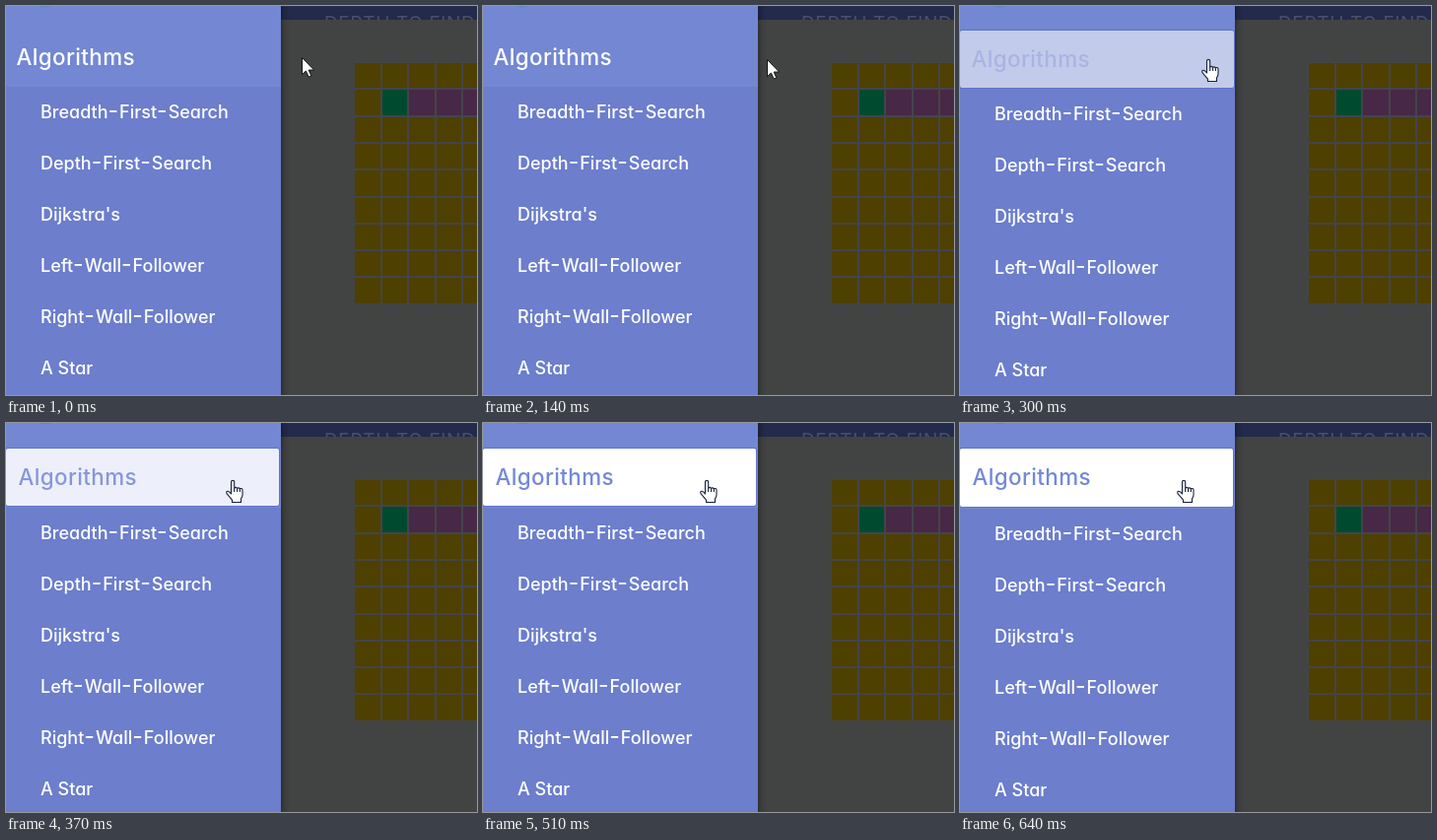
Write an HTML page that moves like this. It is 478x395 px and loops after 700 ms.

```html
<!DOCTYPE html>
<html lang="en">
<head>
<meta charset="utf-8">
<title>Algorithm menu</title>
<style>
  html, body { margin: 0; width: 100%; height: 100%; overflow: hidden; background: #424443; }
  svg { display: block; width: 478px; height: 395px; }
  text { font-family: Inter, "Open Sans", sans-serif; font-feature-settings: "cv11"; }
  #items text { font-size: 18px; font-weight: 500; fill: #fff; }
  #items .hyphen { font-size: 23px; font-weight: 400; letter-spacing: 1px; }
  #label { font-size: 22.4px; font-weight: 500; letter-spacing: .4px; }
  #title { font-size: 19px; letter-spacing: .65px; fill: #4b5065; }
  #grid { shape-rendering: crispEdges; }
</style>
</head>
<body>
<svg viewBox="0 0 478 395">
  <defs>
    <linearGradient id="shade">
      <stop offset="0" stop-color="#000" stop-opacity=".3"/>
      <stop offset=".4" stop-color="#000" stop-opacity=".1"/>
      <stop offset="1" stop-color="#000" stop-opacity="0"/>
    </linearGradient>
    <clipPath id="header"><path d="M279 0H478V14H279Z"/></clipPath>
  </defs>

  <rect width="478" height="395" fill="#424443"/>
  <rect x="279" width="199" height="14" fill="#232a4c"/>
  <text id="title" x="323" y="24" clip-path="url(#header)">DEPTH TO FIND</text>
  <g id="grid"></g>
  <rect x="279" width="9" height="395" fill="url(#shade)"/>

  <rect width="279" height="395" fill="#6c7ecc"/>
  <rect id="top" width="279" height="82" fill="#7387d3"/>
  <ellipse cx="40" cy="-1" rx="7" ry="2.2" fill="#5e86b8"/>
  <rect id="frame" fill="#6174c9" rx="3"/>
  <rect id="button"/>
  <text id="label">Algorithms</text>
  <g id="items"></g>

  <path id="arrow" d="M-.5 -.5V16.6L3.4 13 6.1 19 8.8 17.9 6.2 12H11.6Z"
        fill="#fff" stroke="#111" stroke-linejoin="round"/>
  <g id="hand" fill="#fff" stroke="#17213f" stroke-width="1.1" stroke-linejoin="round">
    <path d="M5.5 14V2a1.6 1.6 0 0 1 3.2 0v6q1.6-1.3 2.9.3 1.6-1 2.8.4 2.2-.8 2.6 1.2v5q0 2-1.5 4v3.6h-9v-2.4L1 13.6Q.2 11.2 2 11.3q1.5.2 3.5 2.7z"/>
    <path d="M8.7 8V12M11.6 8.3V12M14.4 8.7V12" fill="none"/>
  </g>
</svg>
<script>
const LOOP = 700;
const byId = id => document.getElementById(id);

function set(node, attrs) {
  for (const key in attrs) node.setAttribute(key, attrs[key]);
  return node;
}

function add(parent, tag, attrs) {
  const node = document.createElementNS("http://www.w3.org/2000/svg", tag);
  return parent.appendChild(set(node, attrs));
}

// Maze behind the dimmed backdrop
const PITCH_X = 27.5, PITCH_Y = 27.3;
add(byId("grid"), "rect", { x: 354, y: 57, width: 124, height: 246, fill: "#454449" });
for (let row = 0; row < 9; row++) {
  for (let col = 0; col < 5; col++) {
    const onPath = row === 1 && col > 0;
    add(byId("grid"), "rect", {
      x: 354 + col * PITCH_X, y: 58 + row * PITCH_Y, width: 25.5, height: 25.3,
      fill: !onPath ? "#4d4000" : col === 1 ? "#004b30" : "#472846"
    });
  }
}

["Breadth-First-Search", "Depth-First-Search", "Dijkstra's",
 "Left-Wall-Follower", "Right-Wall-Follower", "A Star"].forEach((name, i) => {
  add(byId("items"), "text", { x: 35, y: 114 + 52 * i }).innerHTML =
    name.replaceAll("-", '<tspan class="hyphen">-</tspan>');
});

// The cursor and hover transition advance in discrete steps.
const idle = { shift: 0, top: 24, bottom: 82, right: 279, fill: "#7387d3", ink: "#fff", labelX: 10.5, labelY: 60 };
const raised = { shift: 4, top: 26, bottom: 84, right: 277, fill: "#fff", ink: "#7488d8", labelX: 12.5, labelY: 62.5, hover: true };
const steps = [
  { ...idle, at: 0, cursor: [301, 53] },
  { ...idle, at: 140, cursor: [289, 55] },
  { ...idle, at: 220, cursor: [256, 54], fill: "#7d8fd8", hand: true },
  { ...raised, at: 300, cursor: [245, 54], shift: 2, top: 25, bottom: 83, right: 278,
    fill: "#c3cbea", ink: "#a9b4e3", labelX: 11.5, labelY: 61.5, hand: true },
  { ...raised, at: 370, cursor: [223, 58], fill: "#edf0fa", ink: "#8796dc", hand: true },
  { ...raised, at: 450, cursor: [220, 58], hand: true },
  { ...raised, at: 550, cursor: [220, 58], shift: 5, bottom: 85, labelY: 63, hand: true }
];

function draw(time) {
  const s = steps.findLast(step => step.at <= time % LOOP);
  const height = s.bottom - s.top;
  set(byId("top"), { height: 82 + s.shift });
  set(byId("frame"), { x: -1, y: s.top - 1, width: s.right + 2, height: height + 2, opacity: s.hover ? 1 : 0 });
  set(byId("button"), { y: s.top, width: s.right, height, rx: s.hover ? 2 : 0, fill: s.fill });
  set(byId("label"), { x: s.labelX, y: s.labelY, fill: s.ink });
  set(byId("items"), { transform: `translate(0 ${s.shift})` });
  for (const id of ["arrow", "hand"]) {
    set(byId(id), {
      transform: `translate(${s.cursor})`,
      visibility: (id === "hand") === Boolean(s.hand) ? "visible" : "hidden"
    });
  }
}

const start = performance.now();
function tick() {
  draw(performance.now() - start);
  requestAnimationFrame(tick);
}
tick();
</script>
</body>
</html>
```
